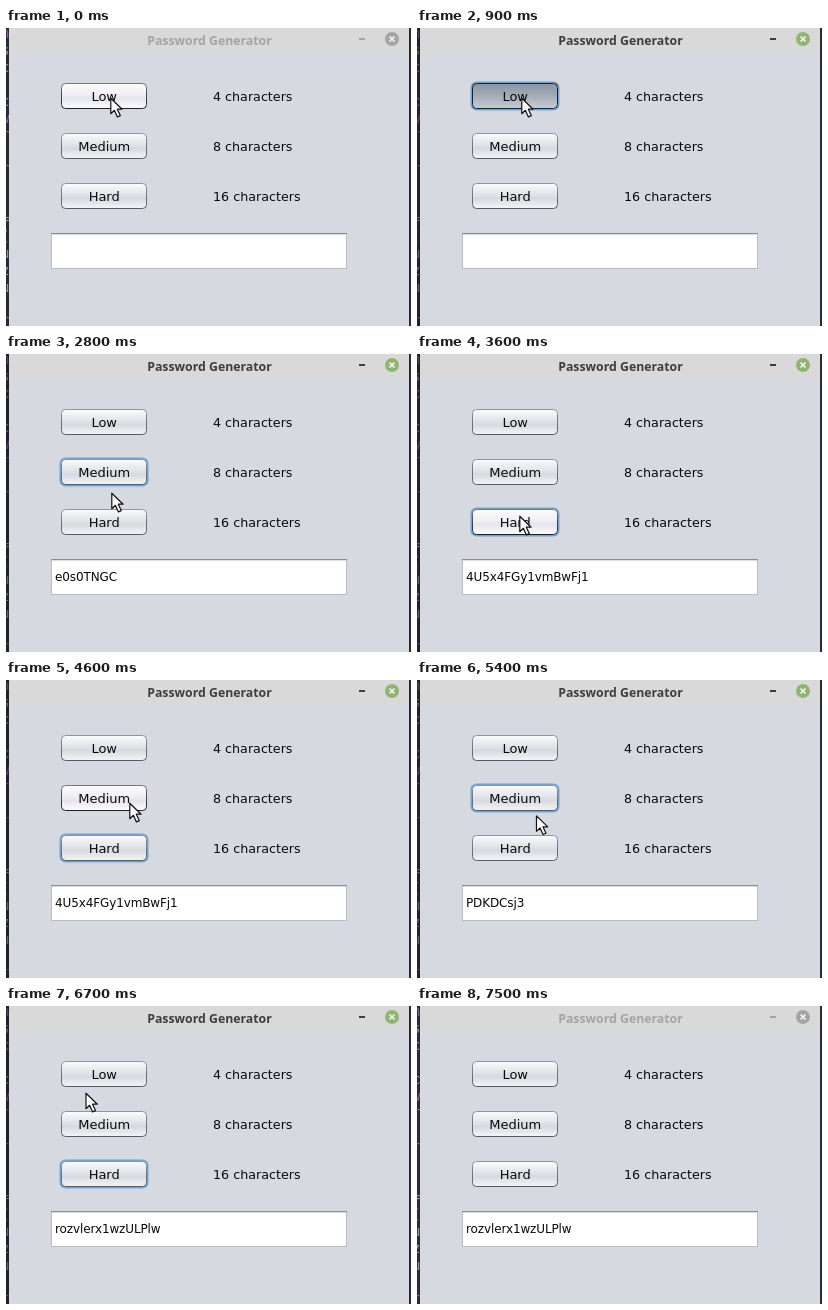
An HTML page for the animation above (7600 ms loop, 405x298 px).

```html
<!DOCTYPE html>
<html lang="en">
<head>
<meta charset="utf-8">
<title>Password Generator</title>
<style>
  html, body { margin: 0; width: 100%; height: 100%; overflow: hidden; background: #d6d9df; }
  svg { display: block; width: 100vw; height: 100vh; }
  text { font: 13px "DejaVu Sans", sans-serif; fill: #0a0a0c; }
  #title { font: bold 12.3px "Noto Sans", "Open Sans", sans-serif; }
  #output { font-size: 12px; letter-spacing: -.12px; }
  #code text { font: 14px "DejaVu Sans Mono", monospace; }
  .label { font-size: 12.7px; }
  .mid { text-anchor: middle; }
</style>
</head>
<body>
<svg viewBox="0 0 405 298">
  <defs>
    <linearGradient id="normal" x2="0" y2="1">
      <stop stop-color="#fafbfc"/><stop offset=".45" stop-color="#e1e3e8"/>
      <stop offset=".6" stop-color="#d6d9df"/><stop offset="1" stop-color="#f3f5f9"/>
    </linearGradient>
    <linearGradient id="hover" x2="0" y2="1">
      <stop stop-color="#fdfdfe"/><stop offset=".45" stop-color="#eeeef4"/>
      <stop offset=".6" stop-color="#e4e4ec"/><stop offset="1" stop-color="#fdfdff"/>
    </linearGradient>
    <linearGradient id="pressed" x2="0" y2="1">
      <stop stop-color="#8b94a0"/><stop offset=".5" stop-color="#a5acb7"/>
      <stop offset="1" stop-color="#c6cdd6"/>
    </linearGradient>
    <linearGradient id="edge" x2="0" y2="1">
      <stop stop-color="#8f939b"/><stop offset="1" stop-color="#555a63"/>
    </linearGradient>
    <linearGradient id="hoverEdge" x2="0" y2="1">
      <stop stop-color="#6f747d"/><stop offset="1" stop-color="#1c2027"/>
    </linearGradient>
  </defs>

  <rect width="405" height="298" fill="#2b2a33"/>
  <g id="code"></g>
  <rect id="shade" width="3" height="298" fill="#15141a"/>

  <rect x="3" width="400" height="298" fill="#d6d9df"/>
  <rect x="3" width="400" height="24" fill="#d9d9d9"/>
  <text id="title" class="mid" x="203.5" y="17">Password Generator</text>
  <rect id="minimize" x="353" y="10" width="6" height="2"/>
  <circle id="close" cx="386" cy="11" r="7"/>
  <path d="M383.5 8.5l5 5m0-5l-5 5" stroke="#f4f4f4" stroke-width="1.7"/>

  <g id="buttons"></g>

  <rect x="45" y="205" width="296" height="36" fill="#b9bcc2"/>
  <rect x="46" y="206" width="294" height="34" fill="#fff"/>
  <path d="M45 205.5h296" stroke="#8b8d92"/>
  <path d="M46 206.5h294" stroke="#dcdde0"/>
  <text id="output" x="49" y="227"></text>

  <path id="cursor" d="M.8 1.2v15.5l3.6-3.4 3 6.6 2.9-1.3-3-6.4h4.8z"
        fill="#fff" stroke="#111" stroke-width="1.2" stroke-linejoin="round"/>
</svg>
<script>
const LOOP = 7600, STEP = 100, BLUR = 7400;
const $ = id => document.getElementById(id);
const clamp = v => Math.max(0, Math.min(1, v));
const lerp = (a, b, k) => a + (b - a) * k;
const mix = (a, b, k) => `rgb(${a.map((v, i) => Math.round(lerp(v, b[i], k)))})`;

function add(parent, tag, attrs, text = "") {
  const el = document.createElementNS("http://www.w3.org/2000/svg", tag);
  for (const k in attrs) el.setAttribute(k, attrs[k]);
  el.textContent = text;
  return parent.appendChild(el);
}

// Line ends of an editor, peeking out at the left of the window
[..."nsc cwr r  =(uzu r"].forEach((ch, i) => add($("code"), "text",
  { x: -5, y: 10 + 16.9 * i, style: `fill:${"nwr".includes(ch) ? "#8f5a9e" : "#8f93a8"}` }, ch));

const buttons = ["Low", "Medium", "Hard"].map((name, i) => {
  const y = 55 + 50 * i, g = $("buttons");
  const ring = add(g, "rect", { x: 54.5, y: y - .5, width: 87, height: 27, rx: 5,
    fill: "none", stroke: "#73a4d1", "stroke-width": 2 });
  const face = add(g, "rect", { x: 55.5, y: y + .5, width: 85, height: 25, rx: 4 });
  add(g, "text", { class: "mid", x: 98.2, y: y + 18 }, name);
  add(g, "text", { class: "label", x: 207, y: y + 18 }, `${4 << i} characters`);
  return { y, ring, face };
});

// Pointer legs: start, end, destination
const legs = [[1200, 1400, 104, 120], [1700, 1800, 106, 118], [2700, 2800, 105, 138],
  [2800, 3200, 102, 161], [3900, 4300, 141, 129], [4300, 4600, 123, 122],
  [5300, 5600, 110, 160], [6500, 7000, 33, -25]];

// Clicks: press, release, button, generated password
const clicks = [
  [800, 1000, 0, "6IxV"], [2000, 2200, 1, "e0s0TNGC"], [3400, 3600, 2, "4U5x4FGy1vmBwFj1"],
  [4900, 5100, 1, "PDKDCsj3"], [6000, 6200, 2, "rozvlerx1wzULPlw"]];

function pointer(t) {
  let x = 104, y = 69;
  for (const [from, to, endX, endY] of legs) {
    const k = clamp((t - from) / (to - from));
    x = lerp(x, endX, k);
    y = lerp(y, endY, k);
  }
  return [x, y];
}

function draw(t) {
  const [x, y] = pointer(t);
  $("cursor").setAttribute("transform", `translate(${x} ${y})`);

  // The previous button keeps its ring for one step after a new press
  let down = -1, focused = [], password = "";
  for (const [press, release, i, text] of clicks) {
    if (t < press) break;
    focused = t < press + STEP ? [...focused, i] : [i];
    if (t < release) down = i;
    else password = text;
  }
  if (t >= BLUR) focused = [];
  $("output").textContent = password;

  buttons.forEach((b, i) => {
    const over = x >= 55 && x < 141 && y >= b.y && y < b.y + 26;
    const look = i === down ? "pressed" : over ? "hover" : "normal";
    const edge = { normal: "url(#edge)", hover: "url(#hoverEdge)", pressed: "#1c222c" }[look];
    b.face.setAttribute("fill", `url(#${look})`);
    b.face.setAttribute("stroke", edge);
    b.ring.setAttribute("visibility", focused.includes(i) ? "visible" : "hidden");
  });

  // Window frame fades in on the first click and out at the end
  const on = clamp(Math.min(t - 700, BLUR + STEP - t) / (2 * STEP));
  const idle = [164, 164, 164];
  $("shade").setAttribute("opacity", .4 * on);
  $("title").style.fill = $("minimize").style.fill = mix(idle, [62, 62, 62], on);
  $("close").style.fill = mix(idle, [145, 181, 112], on);
}

const start = performance.now();
function tick() {
  const t = (performance.now() - start) % LOOP;
  draw(Math.floor(t / STEP) * STEP);
  requestAnimationFrame(tick);
}
tick();
</script>
</body>
</html>
```
